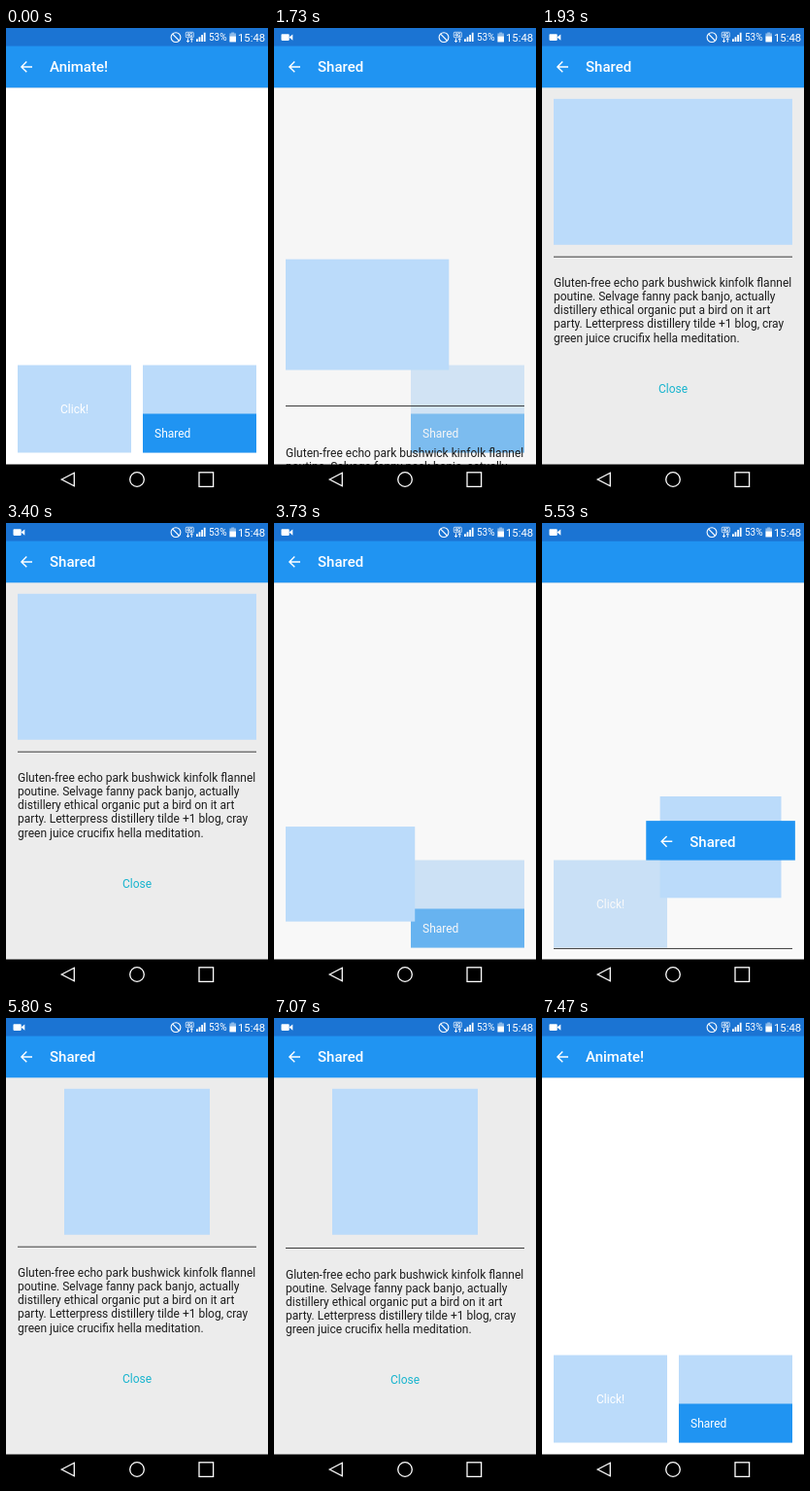
These frames come from a looping animation (270x480 px, 7540 ms). An HTML page:

```html
<!DOCTYPE html>
<html lang="en">
<head>
<meta charset="utf-8">
<title>Shared element transition</title>
<style>
html, body { margin: 0; width: 100%; height: 100%; overflow: hidden; background: #fff; }
svg { display: block; width: 100vw; height: 100vh; font: 12px Roboto, sans-serif; }
.blue { fill: #2094f2; }
.pale { fill: #bbdbfa; }
.white { fill: #fff; }
.stroke { fill: none; stroke: #fff; }
.title { font-size: 15px; font-weight: 500; }
</style>
</head>
<body>
<svg viewBox="0 0 270 480">
  <rect class="white" width="270" height="480"/>

  <g id="clickTile">
    <rect class="pale" x="12" y="346.5" width="117" height="90"/>
    <text class="white" x="56" y="396.3">Click!</text>
  </g>
  <g id="sharedTile">
    <rect class="pale" x="141" y="346.5" width="117" height="90"/>
    <rect class="blue" x="141" y="396.5" width="117" height="40"/>
    <text class="white" x="153" y="421.3">Shared</text>
  </g>

  <rect id="shade" y="61" width="270" height="388" fill="#ececec"/>
  <rect id="hero" class="pale"/>
  <g id="page">
    <rect id="rule" x="12" y="234.7" width="246" height="1" fill="#3c3c3c"/>
    <g id="copy" fill="#1c1c1c"></g>
    <text id="close" x="120" y="374.5" fill="#17b4ce">Close</text>
  </g>

  <rect y="61" width="270" height="1" fill="#a9cfee"/>
  <rect class="blue" y="18" width="270" height="43"/>
  <rect width="270" height="18.75" fill="#1b74d3"/>

  <g id="bar">
    <rect id="barFill" class="blue"/>
    <path class="stroke" stroke-width="1.4" d="M27 21.2H16M21.3 15.8L15.9 21.2L21.3 26.6"/>
    <text id="title" class="white title" x="45" y="26.7"></text>
  </g>

  <g id="camera" class="white">
    <rect x="7.5" y="6.3" width="8.2" height="6.6" rx=".8"/>
    <path d="M15.5 9.6L19.3 6.5V12.7Z"/>
  </g>
  <g class="stroke">
    <circle cx="175" cy="9.6" r="4.9" stroke-width="1.1"/>
    <path d="M171.6 6.2L178.4 13" stroke-width="1.1"/>
    <rect x="185.3" y="4.3" width="8" height="5.4" rx=".8" stroke-width=".7"/>
    <path d="M187.5 10.5V14.5M186 13L187.5 14.5L189 13M191.3 14.7V10.7M189.8 12.2L191.3 10.7L192.8 12.2" stroke-width=".9"/>
  </g>
  <g class="white">
    <text x="186.3" y="8.8" font-size="4.8" font-weight="700">4G</text>
    <path d="M196 14V11.2H197.8V14ZM198.6 14V9.2H200.4V14ZM201.2 14V7H203V14ZM203.8 14V4.8H205.6V14Z"/>
    <text x="209" y="13.3" font-size="10">53%</text>
    <path d="M232.2 4.5H235.2V5.6H237V9H230.4V5.6H232.2Z" opacity=".5"/>
    <rect x="230.4" y="8.6" width="6.6" height="5.8"/>
    <text x="239" y="13.8" font-size="11.3">15:48</text>
  </g>

  <rect y="448.5" width="270" height="31.5"/>
  <g class="stroke" stroke-width="1.3">
    <path d="M57.3 464L70.3 457.2V470.8Z"/>
    <circle cx="135" cy="464" r="7.3"/>
    <rect x="199" y="456.8" width="14.6" height="14.6"/>
  </g>
</svg>
<script>
const LOOP = 7540, FPS = 15, SPAN = 300;
const el = Object.fromEntries([...document.querySelectorAll('[id]')].map(e => [e.id, e]));

const lines = [
  'Gluten-free echo park bushwick kinfolk flannel',
  'poutine. Selvage fanny pack banjo, actually',
  'distillery ethical organic put a bird on it art',
  'party. Letterpress distillery tilde +1 blog, cray',
  'green juice crucifix hella meditation.'
];
el.copy.innerHTML = lines.map((s, i) => `<text x="12" y="${266.3 + i * 14.06}">${s}</text>`).join('');

// Boxes are [x, y, width, height].
const barHome = [0, 18.75, 270, 42];
const trips = [
  { tile: 'clickTile', fade: 1593, move: 1640, slide: 1615, back: 3554, end: 3920,
    from: [12, 346.5, 117, 90], to: [12, 72.75, 246, 150] },
  { tile: 'sharedTile', fade: 5423, move: 5458, slide: 5442, back: 7087, end: 7455,
    from: [141, 346.5, 117, 90], to: [60, 72.75, 150, 150], barFrom: [141, 396.5, 117, 40] }
];

const unit = x => Math.min(1, Math.max(0, x));
const since = (t, start) => unit((t - start) / SPAN);
const smooth = x => (1 - Math.cos(Math.PI * x)) / 2;
const mix = (a, b, p) => a.map((v, i) => v + (b[i] - v) * p);

// cubic-bezier(.4, 0, .2, 1)
function fastOutSlowIn(x) {
  let lo = 0, hi = 1;
  for (let i = 0; i < 24; i++) {
    const u = (lo + hi) / 2, v = 1 - u;
    if (1.2 * u * v * v + 0.6 * u * u * v + u ** 3 < x) lo = u; else hi = u;
  }
  return lo * lo * (3 - 2 * lo);
}

function setBox(node, box) {
  ['x', 'y', 'width', 'height'].forEach((k, i) => node.setAttribute(k, box[i]));
}
function show(node, on) { node.style.display = on ? '' : 'none'; }
function shift(node, x, y) { node.setAttribute('transform', `translate(${x} ${y})`); }

function render(t) {
  const trip = trips.find(r => t >= r.fade && t < r.end);
  const flying = !!trip && t >= trip.move;
  show(el.camera, t > 60);
  for (const r of trips) show(el[r.tile], !(flying && r === trip));
  show(el.hero, flying);
  show(el.page, trip);
  el.title.textContent = flying ? 'Shared' : 'Animate!';

  let bar = barHome, shade = 0;
  if (trip) {
    shade = smooth(since(t, trip.fade)) - smooth(since(t, trip.back));
    const p = fastOutSlowIn(since(t, trip.move)) - fastOutSlowIn(since(t, trip.back));
    setBox(el.hero, mix(trip.from, trip.to, p));
    if (flying && trip.barFrom) bar = mix(trip.barFrom, barHome, p);

    const drop = (1 - since(t, trip.slide)) ** 2 + since(t, trip.back - 37) ** 2;
    shift(el.rule, 0, 418 * drop);
    shift(el.copy, 0, 476 * drop);
    shift(el.close, 0, 476 * drop);
  }
  el.shade.setAttribute('opacity', shade);
  shift(el.bar, bar[0], bar[1]);
  setBox(el.barFill, [0, 0, bar[2], bar[3]]);
}

function tick() {
  const t = performance.now() % LOOP;
  render(Math.floor((t + 4) * FPS / 1000) * 1000 / FPS);
  requestAnimationFrame(tick);
}
tick();
</script>
</body>
</html>
```
